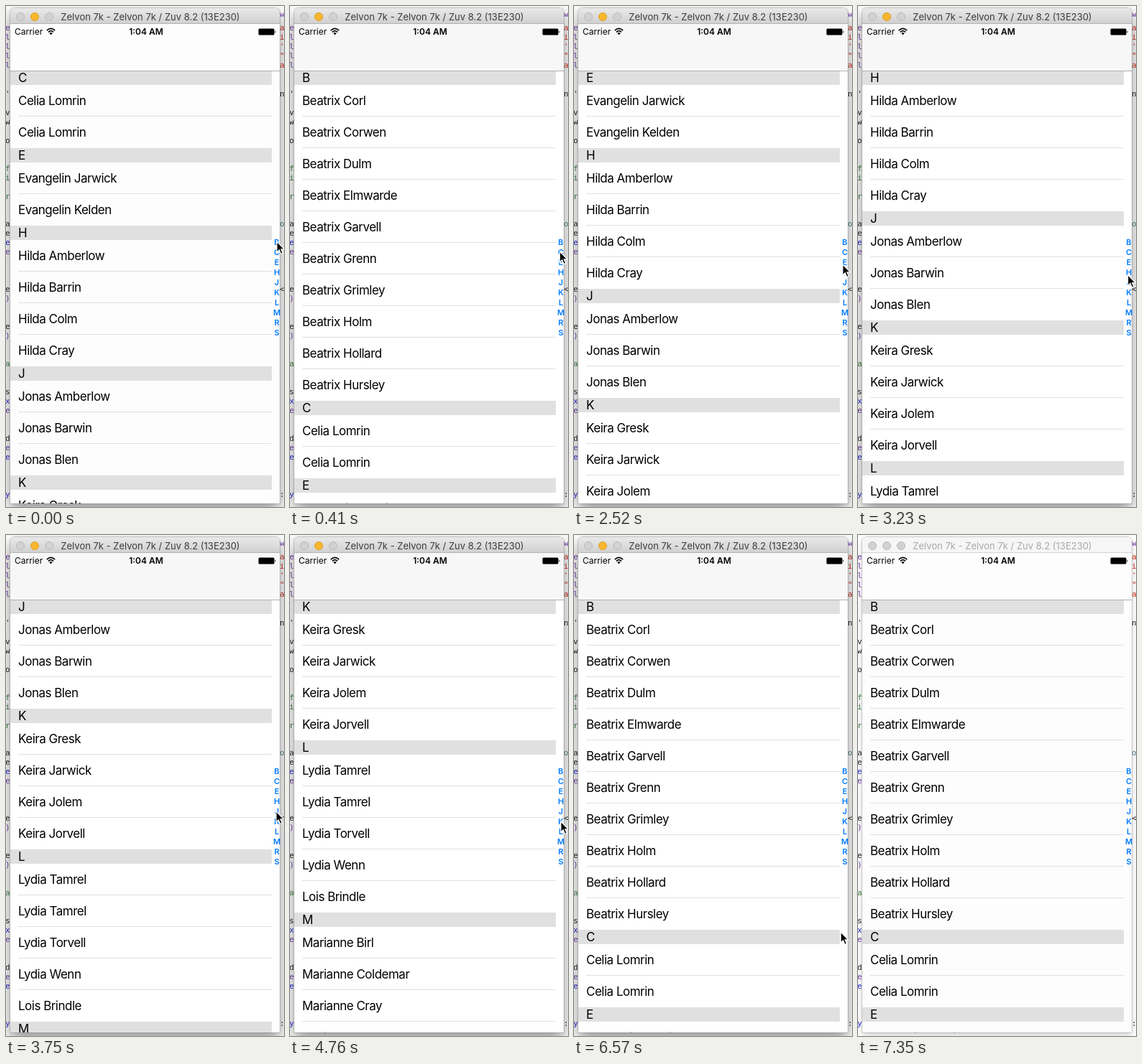
Write an HTML page that moves like this. It is 387 by 698 pixels and loops after 7410 ms.

```html
<!DOCTYPE html>
<html lang="en">
<head>
<meta charset="utf-8">
<title>Indexed contact list</title>
<style>
html, body { margin: 0; width: 100%; height: 100%; overflow: hidden; background: #fff; }
:where(#stage div, #stage span, svg) { position: absolute; top: 0; left: 0; white-space: nowrap; }
#stage { position: relative; width: 387px; height: 698px; overflow: hidden; font-family: Inter, Roboto, sans-serif; }
.code { font: 11px/13px "DejaVu Sans Mono", monospace; }
#win { left: 6px; top: 3px; width: 375px; height: 690px; border-radius: 5px 5px 0 0;
  box-shadow: 0 0 0 .5px #999, 0 8px 20px rgba(0,0,0,.46); }
#bar { width: 375px; height: 22px; border-radius: 5px 5px 0 0; background: linear-gradient(#e9e9e9, #d1d1d1);
  border-bottom: 1px solid #b4b4b4; box-sizing: border-box; }
#title { width: 390px; font-size: 13px; line-height: 24px; text-align: center; color: #3c3c3c; }
.light { top: 6px; width: 12px; height: 12px; box-sizing: border-box; border-radius: 50%;
  background: #d2d2d2; border: 1px solid #b9b9b9; }
#mid { background: #f8b72d; border-color: #dc9c22; }
#screen { top: 22px; width: 375px; height: 668px; overflow: hidden; background: #fff; }
#nav { width: 375px; height: 65px; background: #f7f7f7; border-bottom: 1px solid #b2b2b2; }
#view { top: 65px; width: 375px; height: 603px; overflow: hidden; }
#list { width: 364px; font-size: 17px; letter-spacing: -.5px; color: #000; }
#list div { position: static; }
#list .head { height: 20px; line-height: 20px; padding-left: 11px; background: #e0e0e0; }
#list .row { height: 43px; line-height: 44px; margin-left: 11px; border-bottom: 1px solid #e0e0e0; }
#list .last { border-color: transparent; }
.status { top: 4px; font-size: 12px; line-height: 14px; color: #000; }
.key { left: 367px; width: 20px; text-align: center; font: 600 11px/14px Inter, Roboto, sans-serif; color: #007aff; }
.idle #win { box-shadow: 0 0 0 .5px #aaa, 0 3px 9px rgba(0,0,0,.22); }
.idle #bar { background: #f6f6f6; border-color: #d4d4d4; }
.idle #title { color: #a8a8a8; }
.idle #mid { background: #d2d2d2; border-color: #b9b9b9; }
.pale #screen, .pale #nav { background-color: #fdfdfd; }
</style>
</head>
<body>
<div id="stage">
  <div id="back"></div>
  <div id="win">
    <div id="bar"></div>
    <div id="title">Zelvon 7k - Zelvon 7k / Zuv 8.2 (13E230)</div>
    <div class="light" style="left:8px"></div>
    <div class="light" style="left:28px" id="mid"></div>
    <div class="light" style="left:48px"></div>
    <div id="screen">
      <div id="view"><div id="list"></div></div>
      <div id="nav"></div>
      <span class="status" style="left:6px">Carrier</span>
      <svg style="left:50px;top:5px" width="13" height="11" fill="none" stroke="#000" stroke-width="1.7">
        <path d="M.8 4.2Q6.5-1.3 12.2 4.2M2.9 6.4Q6.5 3 10.1 6.4"/>
        <path d="M4.3 7.9Q6.5 6 8.7 7.9L6.5 10.2Z" fill="#000" stroke="none"/>
      </svg>
      <span class="status" style="left:139px;width:100px;text-align:center;font-weight:600">1:04 AM</span>
      <svg style="left:345px;top:6px" width="26" height="11">
        <rect x=".5" y=".5" width="22" height="9" rx="1.5"/><path d="M23.5 3.2q2 1.8 0 3.6z"/>
      </svg>
    </div>
  </div>
  <div id="index"></div>
  <svg id="arrow" style="overflow:visible" width="14" height="20">
    <path d="M0 0V15L3.4 11.8 5.8 17.5 8.4 16.4 6 10.9H10.6Z" stroke="#fff" stroke-width="1.2"/>
  </svg>
</div>
<script>
const $ = id => document.getElementById(id);
const LOOP = 7410;

// section letter: shared first name, then surnames
const sections = {
  B: ["Beatrix", "Corl Corwen Dulm Elmwarde Garvell Grenn Grimley Holm Hollard Hursley"],
  C: ["Celia", "Lomrin Lomrin"],
  E: ["Evangelin", "Jarwick Kelden"],
  H: ["Hilda", "Amberlow Barrin Colm Cray"],
  J: ["Jonas", "Amberlow Barwin Blen"],
  K: ["Keira", "Gresk Jarwick Jolem Jorvell"],
  L: ["Lydia", "Tamrel Tamrel Torvell Wenn"],
  M: ["Marianne", "Birl Coldemar Cray Dulm Elmwarde Garvell"],
  R: ["Rowena", "Barrin Colm Grenn"],
  S: ["Sabina", "Amberlow Holm Torvell"]
};
const tops = {};
let y = 0, html = "", keys = "";
Object.entries(sections).forEach(([letter, [first, last]], i) => {
  const names = last.split(" ").map(n => first + " " + n);
  if (letter == "L") names.push("Lois Brindle");
  tops[letter] = y;
  y += 20 + 44 * names.length;
  html += `<div class="head">${letter}</div>` + names.map((n, k) =>
    `<div class="row${k == names.length - 1 ? " last" : ""}">${n}</div>`).join("");
  keys += `<div class="key" style="top:${322 + 14 * i}px">${letter}</div>`;
});
$("list").innerHTML = html;
$("index").innerHTML = keys;

// visible edges of the editor behind the window: centre y, colour, text
const ink = { k: "#222", p: "#703daa", b: "#272ad8", g: "#3d8040", t: "#4f8187", r: "#d12f1b" };
const edge = (x, items) => items.split("|").map(s => {
  const [at, colour, text] = s.split(" ");
  return `<span class="code" style="left:${x}px;top:${at - 6}px;color:${ink[colour]}">${text.replace("<", "&lt;")}</span>`;
}).join("");
$("back").innerHTML =
  edge(-1, "30 p e|43 p le|56 p le|69 p le|82 p le|122 k '|148 k v|161 k wD|187 k ou|226 g fo|239 g is|265 g r|" +
    "303 k aS|316 k e.|329 b el|342 p e|394 k e.|407 p )|446 k e.|459 p )|498 g a|537 k s|550 b xi|563 p e|" +
    "602 k d|615 p e|628 b e|680 b y(") +
  edge(381, "11 p w|30 r a|43 r in|56 r '|69 r \"t|82 r ar|122 k ng|303 t oc|394 k <|680 k :");

// list jumps: time, section
const jumps = [[0, "C"], [180, "B"], [1250, "C"], [2520, "E"], [3050, "H"], [3750, "J"], [4760, "K"], [6100, "B"]];

// pointer moves: first step, last step, step count, end x, end y
const moves = [
  [180, 410, 5, 375.5, 342], [1480, 1710, 5, 375.5, 360], [1880, 2110, 5, 372, 360], [2290, 2290, 1, 374, 360],
  [2700, 2880, 4, 375.5, 372], [3170, 3510, 7, 376, 385], [3870, 3980, 3, 377, 399], [4280, 4340, 2, 376, 404],
  [4400, 4400, 1, 377, 399], [4880, 5450, 11, 375, 346], [5510, 5800, 6, 378, 332],
  [6270, 6690, 8, 370, 594], [6750, 7050, 6, 369, 702]
];

function pointer(t) {
  let px = 377, py = 328;
  for (const [from, to, n, x, y] of moves) {
    if (t < from) break;
    const step = n > 1 ? Math.floor((t - from) / (to - from) * (n - 1) + 1e-6) + 1 : 1;
    const p = Math.min(1, step / n), e = p * p * (3 - 2 * p);
    px += (x - px) * e;
    py += (y - py) * e;
  }
  return [px, py];
}

function draw(t) {
  const section = jumps.filter(j => j[0] <= t).pop()[1];
  const [px, py] = pointer(t);
  const idle = t >= 7350;
  $("list").style.transform = `translateY(${-tops[section]}px)`;
  $("arrow").style.transform = `translate(${px}px,${py}px)`;
  $("stage").className = (idle ? "idle " : "") + (idle || t < 180 ? "pale" : "");
}

let start;
function tick(now) {
  start ??= now;
  draw((now - start) % LOOP);
  requestAnimationFrame(tick);
}
draw(0);
requestAnimationFrame(tick);
</script>
</body>
</html>
```
